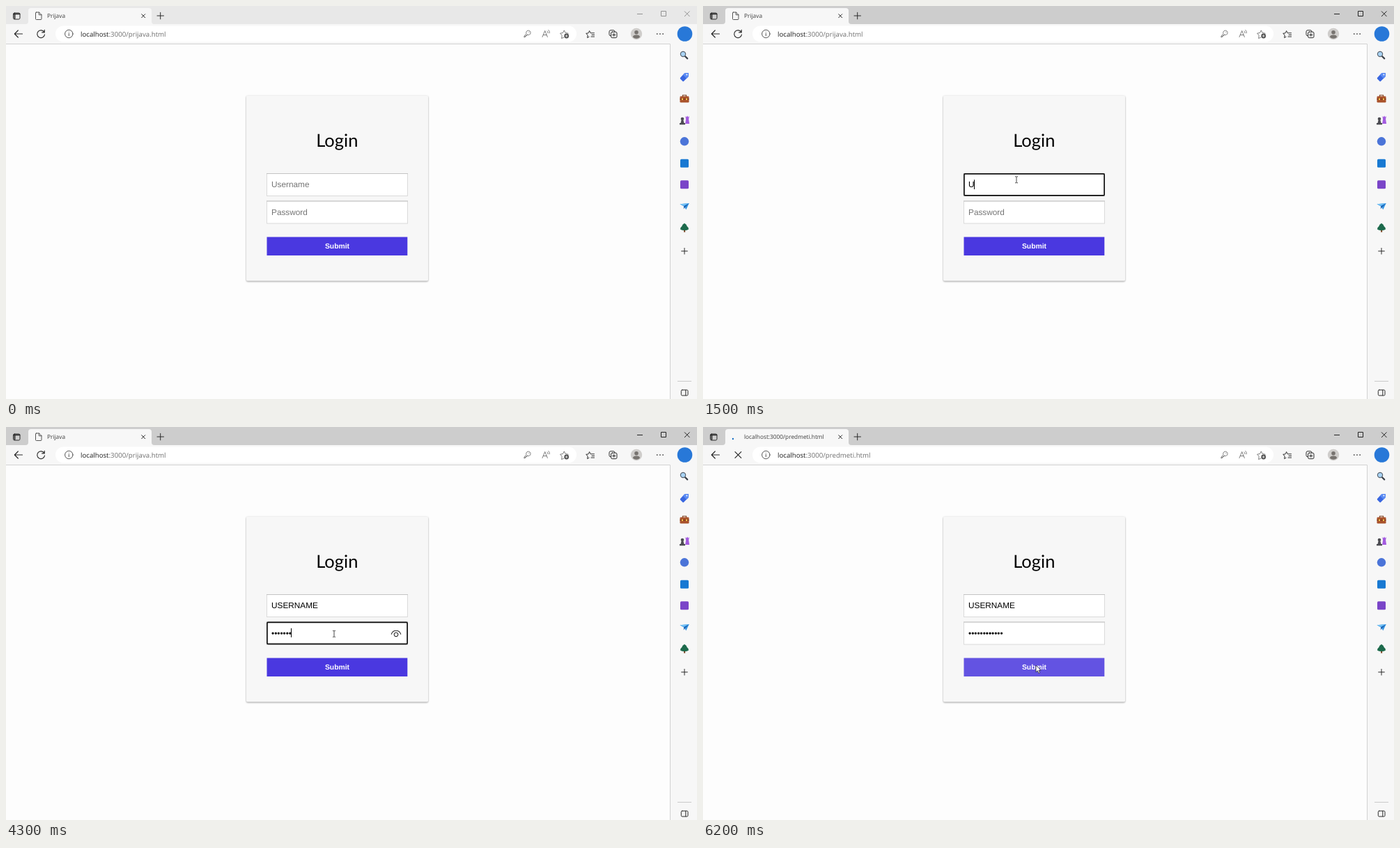
An HTML page for the animation above (6250 ms loop, 992 by 564 pixels).

```html
<!DOCTYPE html>
<html lang="en">
<head>
<meta charset="utf-8">
<title>Login form</title>
<style>
  html, body { margin: 0; width: 100%; height: 100%; overflow: hidden; background: #fdfdfd; }
  svg { display: block; width: 100%; height: 100%; }
  text { text-rendering: geometricPrecision; white-space: pre; }
  .ui { font-family: "Open Sans", "Noto Sans", sans-serif; }
  .form { font: 11.82px "Liberation Sans", Arial, sans-serif; }
  .line { fill: none; stroke: #2b2b2b; stroke-width: 1; stroke-linecap: round; stroke-linejoin: round; }
  .soft { stroke: #707070; stroke-width: .9; }
  #card { filter: drop-shadow(0 1.5px .8px rgba(0, 0, 0, .38)); }
</style>
</head>
<body>
<svg viewBox="0 0 992 564">
  <rect width="992" height="564" fill="#fdfdfd"/>

  <!-- title bar -->
  <rect id="bar" width="992" height="26"/>
  <path d="M28 26q4 0 4-4V7q0-4 4-4h169q4 0 4 4v15q0 4 4 4z" fill="#f7f7f7"/>
  <g class="line">
    <rect x="10.5" y="10" width="9.5" height="9" rx="1.8"/>
    <path d="M11 11.4h8.5M12.5 12v6" stroke-width="1.8"/>
    <path d="M194.7 11.7l5 5m0-5l-5 5M217 14h9.5M221.7 9.3v9.5"/>
  </g>
  <path id="doc" class="line" d="M43.5 9h4l3.5 3.5v6q0 1-1 1h-6.5q-1 0-1-1v-8.5q0-1 1-1zM47.3 9v3.7h3.6" style="stroke:#555"/>
  <circle id="dot" cx="43" cy="17" r="1.2" fill="#1a6fc4"/>
  <text id="tab" class="ui" x="59" y="17" font-size="8.32" fill="#3c3c3c"></text>
  <path id="win" fill="none" d="M906 11.5h8M940.5 7.5h7v7h-7zM974 7.5l7.5 7.5m0-7.5l-7.5 7.5"/>

  <!-- toolbar -->
  <rect y="26" width="992" height="28" fill="#f7f7f7"/>
  <rect x="953" y="54" width="39" height="510" fill="#f7f7f7"/>
  <path d="M0 54.5h953.5V564" fill="none" stroke="#d2d2d2"/>
  <rect x="71" y="28.5" width="748" height="23" rx="11.5" fill="#fff"/>
  <g class="line">
    <path d="M23.5 40h-11m4.8-5l-5 5 5 5" stroke-width="1.2"/>
    <path id="reload" d="M55 37.8A5.4 5.4 0 1 0 55.5 41M55.2 34.4v3.5h-3.5" stroke-width="1.2"/>
    <path id="stop" d="M46 35.6l8.8 8.8m0-8.8l-8.8 8.8" stroke-width="1.2"/>
    <g stroke="#555">
      <circle cx="90.3" cy="40" r="5.7"/>
      <path d="M90.3 39.3v3.3M90.3 37.2v.1"/>
    </g>
  </g>
  <text class="ui" x="107" y="43.6" font-size="9.68" fill="#6e6e6e"><tspan fill="#1e1e1e">localhost</tspan><tspan id="url"></tspan></text>
  <g class="line soft">
    <path d="M748.4 40.7l-4.4 4.3v-2l3-3.2a3.2 3.2 0 1 1 1.8 1.6l-1.8 1.6h-1.5v1.5h-1.5M750.8 37.7v.1"/>
    <path d="M770 44.5l3.7-9 3.6 9m-6-3h4.8M777 36q1.2 1 1 2.8M778.8 34.5q2 1.6 1.5 4.3"/>
    <path d="M801 45l-3.4 1.5.6-4.3-2.6-3 3.9-.7 1.8-3.6 1.8 3.6 3.9.7"/>
  </g>
  <circle cx="804.7" cy="43" r="3.4" fill="#555"/>
  <path d="M803 43h3.4m-1.7-1.7v3.4" stroke="#fff" stroke-width=".8"/>
  <g class="line">
    <path d="M837 44.2l-2.4 1.3.6-3.7-2.5-2.4 3.4-.6 1.5-3.2 1.6 3.2h5.3M841 41.4h3.6M840 44h4.6"/>
    <path d="M868 42.8q-2 0-2-2v-4q0-2 2-2h4q2 0 2 2"/>
    <rect x="868.6" y="37.2" width="8.4" height="8.4" rx="1.8"/>
    <path d="M870.7 41.4h4.2m-2.1-2.1v4.2"/>
  </g>
  <circle cx="905" cy="40" r="8.2" fill="#cfcdcb"/>
  <circle cx="905" cy="37.7" r="2.8" fill="#77736f"/>
  <path d="M900 44.8q0-3.2 5-3.2t5 3.2q-2 2-5 2t-5-2z" fill="#77736f"/>
  <path d="M934.7 40h.1m4.1 0h.1m4.1 0h.1" class="line" style="stroke-width:1.7"/>

  <!-- side bar -->
  <circle cx="974.5" cy="40" r="10.8" fill="#2878d8"/>
  <path d="M975 72.2l3.2 3.2" stroke="#3a4048" stroke-width="2.2" stroke-linecap="round"/>
  <circle cx="972" cy="69" r="3.6" fill="#a9d4f5" stroke="#59636e" stroke-width="1.2"/>
  <path d="M974 96.5l5-.5q1 0 1 1l-.5 4.5-6.3 6.3q-1 1-2 0l-3-3q-1-1 0-2z" fill="#3a67e0"/>
  <path d="M974 96.5l5-.5q1 0 1 1l-.5 4.5-2.5 2.5-5.2-5.3z" fill="#5b8cf4"/>
  <circle cx="977.4" cy="98.5" r="1" fill="#fff"/>
  <path d="M971.5 130v-2h5v2" fill="none" stroke="#7b3c1c" stroke-width="1.2"/>
  <rect x="967.5" y="129.5" width="13" height="9" rx="1.3" fill="#a9522b"/>
  <path d="M967.5 133.6h13" stroke="#723218"/>
  <path d="M970 132.5h2v2.5h-2zM976 132.5h2v2.5h-2z" fill="#f2c14b"/>
  <path d="M975.3 158l1.5 1.5 1.3-2 1.3 2 1.5-1.5-.8 4.5 1 6.5h-6l1-6.5z" fill="#a35be0"/>
  <circle cx="971" cy="162" r="2.3" fill="#4c4c52"/>
  <path d="M969.5 164h3l1 4h1.5v2.3h-8V168h1.5z" fill="#4c4c52"/>
  <circle cx="974" cy="194.3" r="6.2" fill="#4b74d8"/>
  <rect x="968" y="219.8" width="12" height="12" rx="1.5" fill="#1879d2"/>
  <rect x="968" y="250.3" width="12" height="12" rx="1.5" fill="#7a45c8"/>
  <path d="M967.5 284.2l13.2-1.2-4.4 9.3-2.6-4.2z" fill="#3593e2"/>
  <path d="M980.7 283l-7.5 4.5-.5 4 1.7-2.2z" fill="#1b5fae"/>
  <path d="M967.5 284.2l13.2-1.2-8 3.8z" fill="#74c2f5"/>
  <rect x="973" y="320" width="2.2" height="4.5" fill="#7a4a2b"/>
  <path d="M974 311.8q3.4 1.8 3.6 4.3 2.6 1.6 2.4 4.3-2.4 1.6-6 1.6t-6-1.6q-.2-2.7 2.4-4.3.2-2.5 3.6-4.3z" fill="#1d6a4c"/>
  <path d="M969.7 351.8h8.6m-4.3-4.3v8.6" class="line"/>
  <path d="M964 538.5h20" stroke="#c9c9c9"/>
  <rect x="969.3" y="551" width="9.7" height="8" rx="1.5" class="line"/>
  <path d="M975.8 551.3v7.4" class="line"/>

  <!-- login card -->
  <rect id="card" x="345" y="128.5" width="261" height="266" rx="1.8" fill="#f7f7f7"/>
  <text x="475.3" y="202" font-size="25.5" text-anchor="middle" font-family="Lato, sans-serif">Login</text>
  <g id="fields" class="form"></g>
  <path id="eye" class="line" d="M553.3 297.3q1.7-5 6.7-5t6.7 5M557.2 297.8a2.8 2.8 0 1 0 5.6 0a2.8 2.8 0 1 0-5.6 0" style="stroke-width:1.1"/>
  <rect id="button" x="374.5" y="331.5" width="201.8" height="26.5"/>
  <text class="form" x="475.5" y="348" text-anchor="middle" fill="#fff" style="font-size:10.35px;font-weight:bold">Submit</text>

  <path id="beam" fill="none" stroke="#333" d="M-2-4.5h1.5l.5.5.5-.5H2M0-4v8M-2 4.5h1.5l.5-.5.5.5H2" stroke-width=".9"/>
  <path id="arrow" d="M0 0v9.8l2.3-2.1 1.6 3.6 1.7-.7L4 7.1h3.1z" fill="#fff" stroke="#222" stroke-width=".7"/>
</svg>
<script>
const LOOP = 6250, TICK = 50, TEXT_X = 381;
const $ = id => document.getElementById(id);
const set = (el, attrs) => { for (const k in attrs) el.setAttribute(k, attrs[k]); };
const show = (el, on) => el.setAttribute('visibility', on ? 'visible' : 'hidden');
const inside = (p, x, y, w, h) => p.x >= x && p.x <= x + w && p.y >= y && p.y <= y + h;

function add(parent, tag, attrs) {
  const el = document.createElementNS(parent.namespaceURI, tag);
  set(el, attrs);
  return parent.appendChild(el);
}

function makeField(y, caretH, hint, value, keys, focus, blur) {
  const g = $('fields'), x = 374.5;
  return {
    y, hint, value, keys, focus, blur,
    box: add(g, 'rect', { x, y: y + .5, width: 202, height: 32, fill: '#fff' }),
    top: add(g, 'path', { d: `M374 ${y + .5}h203` }),
    ring: add(g, 'rect', { x: 374.9, y: y + .9, width: 201.2, height: 31, rx: 1.4, fill: '#fff', stroke: '#111', 'stroke-width': 1.7 }),
    text: add(g, 'text', { x: TEXT_X, y: y + 20.1 }),
    caret: add(g, 'rect', { y: y + 9.3, width: 1, height: caretH, fill: '#000' })
  };
}

const user = makeField(240, 13.7, 'Username', 'USERNAME',
  [1500, 1600, 1750, 1850, 2050, 2100, 2200, 2250], 700, 2900);
const pass = makeField(279.5, 13, 'Password', '•'.repeat(12),
  [3450, 3500, 3750, 3850, 4050, 4200, 4300, 4450, 4650, 4700, 4900, 5000], 2900, 6050);

// start, end, from, to
const moves = [
  [100, 400, 896, 552, 450, 249.3],
  [2600, 2900, 450, 249.3, 471, 296.8],
  [5350, 5800, 471, 296.8, 478, 342]
];

function pointer(t) {
  const [a, b, x0, y0, x1, y1] = moves.filter(m => t >= m[0]).pop() || moves[0];
  const u = Math.min(1, Math.max(0, (t - a) / (b - a)));
  const e = u * u * (3 - 2 * u);
  return { x: x0 + (x1 - x0) * e, y: y0 + (y1 - y0) * e };
}

function drawField(f, t, p) {
  const count = f.keys.filter(k => t >= k).length;
  const focused = t >= f.focus && t < f.blur;
  const hover = t >= 100 && inside(p, 374, f.y, 203, 33);
  f.text.textContent = count ? f.value.slice(0, count) : f.hint;
  set(f.text, { fill: count ? '#000' : '#757575' });
  set(f.box, { stroke: hover ? '#b5b5b5' : '#dadada' });
  set(f.top, { stroke: hover ? '#a2a2a2' : '#c3c3c3' });
  show(f.ring, focused);

  const last = count ? f.keys[count - 1] : f.focus;
  const width = count ? f.text.getComputedTextLength() : 0;
  set(f.caret, { x: Math.floor(TEXT_X + width) });
  show(f.caret, focused && (t - last) % 850 < 400);
  return { count, focused, hover };
}

function draw(t) {
  const p = pointer(t), loading = t >= 6150;
  set($('bar'), { fill: t < 700 ? '#e8e8e8' : '#cdcdcd' });
  set($('win'), { stroke: t < 800 ? '#929292' : '#222' });

  const path = loading ? ':3000/predmeti.html' : ':3000/prijava.html';
  $('url').textContent = path;
  $('tab').textContent = loading ? 'localhost' + path : 'Prijava';
  show($('doc'), !loading);
  show($('reload'), !loading);
  show($('stop'), loading);
  show($('dot'), t >= 6200);

  const u = drawField(user, t, p), w = drawField(pass, t, p);
  show($('eye'), w.focused && w.count > 0);
  const onButton = t >= 100 && inside(p, 374.5, 331.5, 202, 26.5);
  set($('button'), { fill: onButton ? '#6353e2' : '#4a38e0' });

  const typing = u.hover || w.hover;
  for (const id of ['beam', 'arrow']) set($(id), { transform: `translate(${p.x} ${p.y})` });
  show($('beam'), t >= 100 && typing);
  show($('arrow'), t >= 100 && !typing);
}

const start = performance.now();
function frame() {
  const t = (performance.now() - start) % LOOP;
  draw(Math.floor(t / TICK) * TICK);
  requestAnimationFrame(frame);
}
frame();
</script>
</body>
</html>
```
